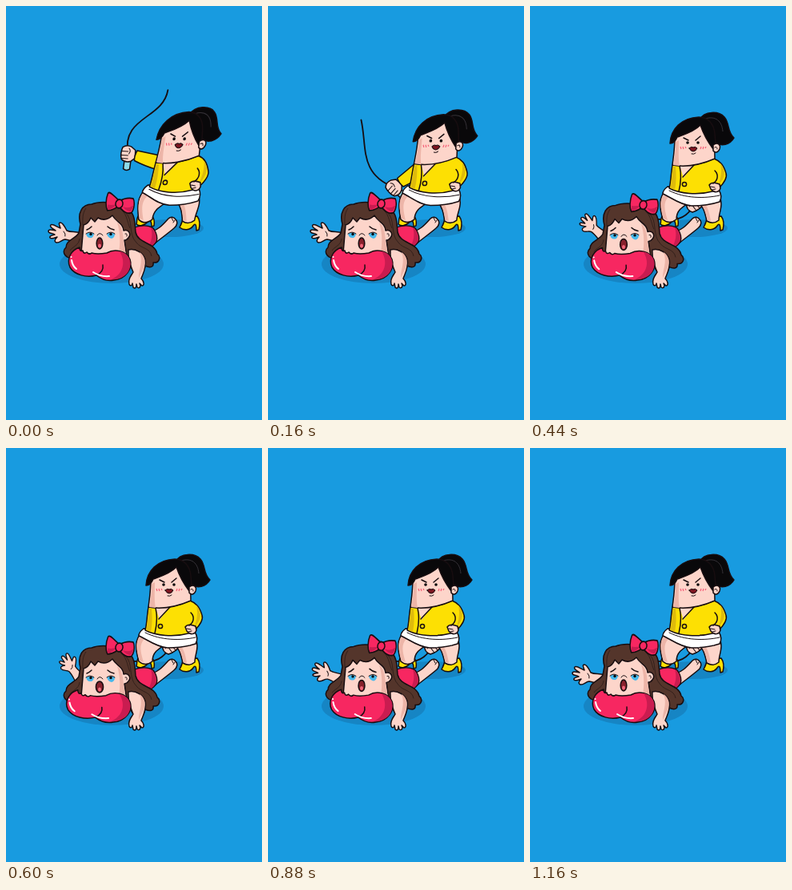
An HTML page for the animation above (1600 ms loop, 320 px wide and 518 px high).

```html
<!DOCTYPE html>
<html>
<head>
<meta charset="utf-8">
<style>
html, body { margin: 0; width: 100%; height: 100%; overflow: hidden; background: #189be0; }
svg { display: block; width: 100%; height: 100%; }
.o { stroke: #170d10; stroke-width: 1.5; stroke-linejoin: round; stroke-linecap: round; }
.l { fill: none; }
.skin { fill: #fdd5ca; }
.tan { fill: #edb5a8; }
.yel { fill: #fde003; }
.gold { fill: #dfbb0c; }
.pink { fill: #f72761; }
.rose { fill: #c91c50; }
.brown { fill: #54352b; }
.ink { fill: #09080a; }
.white { fill: #fff; }
.shade { fill: #1685c4; }
.thin { stroke-width: 1; }
</style>
</head>
<body>
<svg viewBox="0 0 320 518">
  <ellipse class="shade" cx="132" cy="323" rx="65" ry="24"/>
  <ellipse class="shade" cx="205" cy="278" rx="42" ry="11"/>

  <!-- lying body -->
  <path class="skin o" d="M176 284C190 281 196 274 203 266C206 263 210 264 212 267C215 270 214 275 210 278C203 284 196 289 186 297Z"/>
  <path class="l o thin" d="M207 265l2 4M211 268l-2 3"/>
  <path class="pink o" d="M158 278C168 274 178 274 184 278C188 284 190 290 188 295C184 301 178 303 174 309L160 305Z"/>
  <path class="rose" d="M181 277C188 282 189 289 187 295C184 300 180 302 177 304C182 294 184 287 181 277Z"/>

  <!-- whip and its arm -->
  <path id="whip" class="l o" style="stroke-width:1.8"/>
  <g id="arm">
    <g transform="translate(40 0) rotate(167)">
      <path d="M-4 7L-5 19Q-1 22 3 19L4 7Z" fill="#8edbe8" class="o"/>
      <path class="skin o" d="M-7 -8Q-2 -12 4 -9L9 -5L9 5L4 9Q-3 12 -8 7Q-10 0 -7 -8Z"/>
      <path class="l o thin" d="M-8 -3H0M-9 2H0M-8 6H0M1 -7Q4 -4 1 0"/>
    </g>
    <path class="yel o" d="M0 -9Q16 -9 30 -6Q32 0 30 7Q14 8 0 9Z"/>
  </g>

  <!-- standing woman -->
  <path class="yel o" d="M165 263C163 267 164 270 163 273C166 276 173 275 177 270C180 267 182 269 182 276L185 275C186 269 185 265 182 262Z"/>
  <path class="yel o" d="M221 264C221 270 219 273 217 277C222 281 230 281 234 275C236 272 238 272 238 281L241 280C243 272 242 267 239 263Z"/>
  <g id="woman">
    <path class="skin o" d="M170 231C160 239 162 253 166 267Q174 274 183 267C183 260 185 257 188 254C194 249 196 248 199 246Z"/>
    <path class="tan" d="M169 236C161 240 163 254 167 266L172 268C168 255 166 246 173 239Z"/>
    <path class="skin o" d="M211 246C218 253 219 261 221 269Q229 274 236 268C236 258 242 250 237 238Z"/>
    <path class="tan" d="M213 247C219 253 220 261 222 268L226 269C224 258 222 251 218 247Z"/>
    <path class="white o" d="M172 226C168 229 166 232 166 235C176 239 187 249 202 250C216 250 228 248 237 245C240 240 239 235 236 230Z"/>
    <path class="l o thin" d="M174 231C194 241 218 241 237 237"/>
    <path class="yel o" d="M178 199C176 211 176 221 174 228C187 235 210 237 228 232L236 228C243 221 247 215 245 209C242 199 238 194 230 191C214 198 195 201 178 199Z"/>
    <path class="gold" d="M179 201C177 212 177 221 175.500 228L181 230C183 220 183 211 182 201Z"/>
    <path class="gold" d="M238 197C245 206 245 214 235 225C239 214 240 207 238 197Z"/>
    <path class="skin" d="M187 200L192 215L205 198Z"/>
    <path class="l o" d="M187 200C189 209 189 220 186 232M205 199L191 214"/>
    <circle class="yel o" cx="193" cy="223" r="2.6"/>
    <path class="skin o" d="M224 224C227 220 232 221 237 223L238 228C236 234 230 234 226 229Z"/>
    <path class="l o thin" d="M226 226l5 1M228 230l4 -1"/>
    <path class="l o" d="M231 206C236 211 235 218 229 222"/>

    <path class="skin o" d="M181 162C181 180 179 190 178 199C195 202 215 198 231 191C231 180 231 172 228 155L210 146Z"/>
    <path class="tan" d="M182 170C182 186 180 194 179 199L187 200C185 190 186 180 186 168Z"/>
    <path class="ink o" d="M212 142C218 131 236 131 243 139C250 147 246 157 255 165C250 174 239 176 232 171C228 160 224 150 220 146Z"/>
    <path class="l" stroke="#363238" d="M219 141C232 137 240 144 241 157"/>
    <path class="ink o" d="M175 172C176 154 189 140 211 139C223 139 230 148 231 160L232 172L229 179C223 171 217 161 213 149C204 158 192 161 184 164C182 169 179 172 175 172Z"/>
    <path class="skin o" d="M229 174C234 170 239 173 237 179C235 184 231 184 229 181Z"/>
    <path class="l o thin" d="M231 177q3 -2 3 2"/>
    <path class="l o" d="M192 165L198 168M207 168L213 163"/>
    <circle class="ink" cx="197" cy="171" r="1.8"/>
    <circle class="ink" cx="210" cy="171" r="1.8"/>
    <path class="l" stroke="#f55e76" stroke-width="1.2" d="M188 176l1 3m2 -3l1 3m2 -3l1 2M214 176l-1 3m4 -3l-1 3m4 -3l-1 2"/>
    <path class="o thin" fill="#7d1520" d="M199 178Q202 175 204 177Q206 175 209 178Q207 182 204 182Q201 182 199 178Z"/>
    <path class="l o thin" d="M202 185q3 1 5 -1"/>
  </g>

  <!-- lying woman, front -->
  <g id="reach">
    <path class="skin o" d="M96 285C87 281 82 284 76 281C74 277 71 271 68 271C65 271 67 275 68 278C63 276 58 272 56 274C54 276 59 279 62 281C57 280 53 279 53 282C53 285 58 284 61 286C57 287 54 288 55 290C57 292 61 290 64 289C61 292 60 295 63 296C67 297 70 292 74 292C82 293 88 298 96 300Z"/>
    <path class="l o thin" d="M72 282q3 3 2 6"/>
  </g>
  <g id="head">
    <path class="brown o" d="M93 273C89 259 95 248 107 248C119 243 143 246 153 254C162 261 161 274 162 283C165 298 186 295 189 310C194 314 192 322 184 321C185 327 180 328 174 325C172 335 161 337 156 326L146 312L94 306C89 313 85 311 84 314C76 318 68 308 75 302C75 293 86 292 91 284Z"/>
    <path class="l" stroke="#33201b" d="M149 258C160 268 152 285 163 296C169 304 180 302 182 313M139 251C152 258 151 270 155 278M100 253C95 260 96 267 96 274M80 306C83 301 91 300 92 291"/>
    <path class="skin o" d="M94 309L97 274C101 273 104 270 106 265L111 270L115 265C122 269 128 267 133 262C138 271 146 271 147 281C153 279 157 285 153 290C151 293 150 293 148 293L151 314Z"/>
    <path class="tan" d="M139 271C145 275 146 283 147 294L150 312L141 309C143 296 143 284 139 271Z"/>
    <path class="l o thin" d="M149 285q3 -1 2 3"/>
    <path class="l o" d="M101 280Q104 279 107 276M127 276Q130 279 135 280"/>
    <path fill="#46b9ec" d="M100 285Q105 282 110 285Q109 291 105 290Q101 290 100 285ZM126 285Q131 282 136 285Q136 290 132 291Q127 290 126 285Z"/>
    <path class="l o thin" d="M100 285Q105 281 110 285M126 285Q131 281 136 285"/>
    <circle class="ink" cx="106" cy="285.500" r="1.7"/>
    <circle class="ink" cx="131" cy="285.500" r="1.7"/>
    <path class="l o thin" d="M114 287Q117 282 121 287"/>
    <ellipse id="mouth" class="o" fill="#86202b" cx="117" cy="297" ry="7"/>
    <ellipse cx="117" cy="300" rx="2" ry="2.500" fill="#f1657a"/>
    <g transform="translate(141.500 247.500) rotate(10) scale(1 1.2)">
      <path class="pink o" d="M0 -3C-7 -6 -14 -12 -16 -9C-18 -2 -16 6 -13 9C-7 8 -3 5 0 2C6 8 13 9 17 7C20 3 19 -5 16 -8C10 -8 4 -6 0 -3Z"/>
      <path class="rose" d="M-14 3Q-9 3 -3 1Q-8 7 -13 8ZM5 2Q12 4 18 -1Q17 5 15 6Q9 6 5 2Z"/>
      <circle class="pink o" r="4.500"/>
    </g>
  </g>
  <path class="skin o" d="M153 305C163 303 171 309 174 317C176 328 171 335 169 341C173 345 173 350 170 350L167 347C169 351 167 354 164 352L163 348C163 353 161 354 159 352L158 347C158 350 155 351 154 348C152 341 157 337 159 333C157 327 152 320 153 305Z"/>
  <path class="tan" d="M167 308C177 315 174 326 169 334L166 340C165 332 172 321 167 308Z"/>
  <g id="chest">
    <path class="pink o" d="M92 302Q92 308 96 306Q97 311 101 308Q104 312 107 309C114 311 120 310 126 309C136 303 150 306 155 317C159 329 149 342 135 343C125 345 118 341 113 337C101 340 86 337 80 327C75 316 82 305 92 302Z"/>
    <path class="rose" d="M142 307C154 309 159 321 153 332C149 339 141 342 132 342C147 335 150 320 142 307Z"/>
    <path class="l o" d="M113 337C119 334 122 329 121 324"/>
    <path class="l" stroke="#fff" stroke-width="2" stroke-linecap="round" d="M82 318Q83 325 88 329M109 333Q118 339 129 338M81.500 314v.1"/>
  </g>
</svg>
<script>
const LOOP = 1600, STEP = 40, LAST = 29;
const $ = id => document.getElementById(id);
const clamp = v => Math.max(0, Math.min(1, v));
const place = (id, value) => $(id).setAttribute('transform', value);

// Rises quickly after the lash, then settles slowly.
function flinch(s) {
  const rise = Math.sin(clamp((s - 8) / 6) * Math.PI / 2);
  const fall = Math.cos(clamp((s - 14) / 15) * Math.PI / 2) ** 4;
  return rise * fall;
}

function drawWoman(s) {
  const lean = 1 - clamp(s / 8);
  place('woman', `translate(0 266) skewX(${-7.5 * lean}) scale(1 ${1 + .05 * lean}) translate(0 -266)`);

  // The arm turns steadily about the shoulder, the whip about the hand.
  const turn = Math.min(s, 10);
  const angle = 196 - 13 * turn, rad = angle * Math.PI / 180;
  const x = 189 + 2 * lean, y = 211 - 15 * lean;
  place('arm', `translate(${x} ${y}) rotate(${angle})`);
  place('whip', `translate(${x + 40 * Math.cos(rad)} ${y + 40 * Math.sin(rad)}) rotate(${32 - 14.5 * turn})`);
  const bend = 14 - 22 * Math.sin(turn / 8 * Math.PI);
  $('whip').setAttribute('d', `M0 0C-32 -35 ${bend} -60 0 -94`);
}

function drawVictim(s) {
  const hit = flinch(s);
  place('reach', `translate(95 290) rotate(${39 * hit}) scale(${1 - .1 * hit}) translate(-95 -290)`);
  place('head', `translate(0 ${2 * hit})`);
  place('chest', `translate(156 343) scale(${1 + .035 * hit} ${1 - .02 * hit}) translate(-156 -343)`);
  $('mouth').setAttribute('rx', 3.8 + .8 * hit);
}

const start = performance.now();
function draw() {
  const s = Math.min(LAST, Math.floor((performance.now() - start) % LOOP / STEP));
  drawWoman(s);
  drawVictim(s);
  requestAnimationFrame(draw);
}
draw();
</script>
</body>
</html>
```
